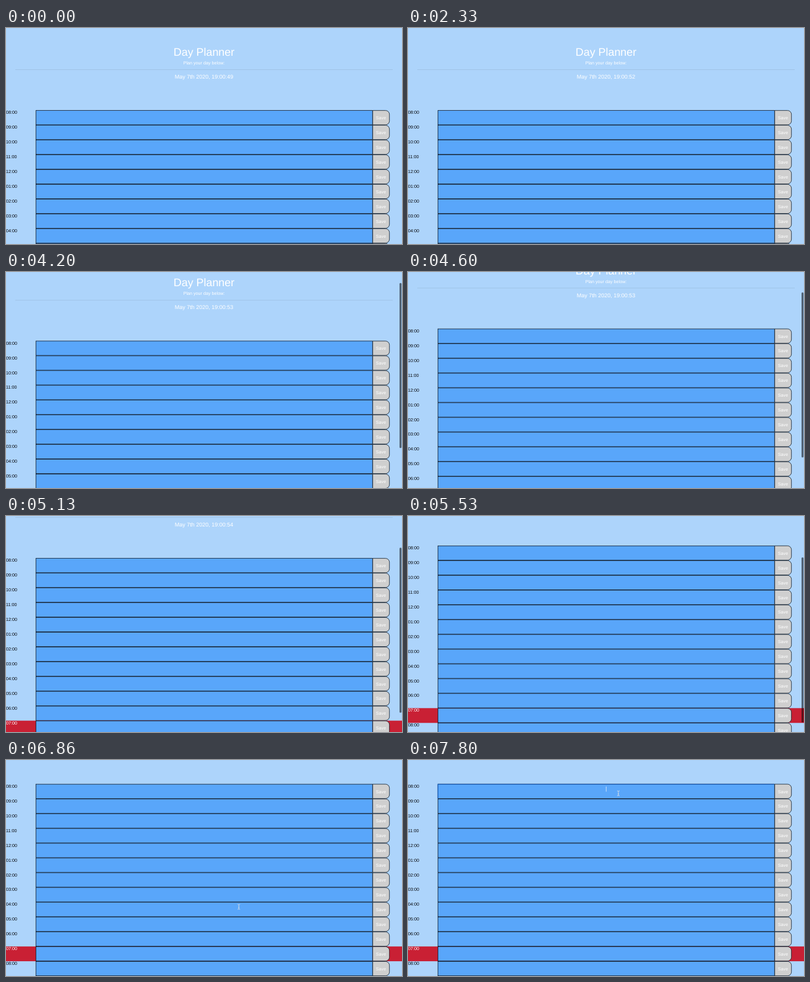
An HTML page that plays this animation: 640 px wide and 350 px high, repeating every 8000 ms.

```html
<!DOCTYPE html>
<html lang="en">
<head>
<meta charset="utf-8">
<title>Day Planner</title>
<style>
  html, body { margin: 0; width: 100%; height: 100%; overflow: hidden; background: #add4fb; }
  svg { display: block; width: 640px; height: 350px; }
  text { font: 7.2px "Liberation Sans", Arial, sans-serif; fill: #fff; text-rendering: geometricPrecision; }
  .middle { text-anchor: middle; }
  .box { stroke: #06101c; stroke-width: .75; }
</style>
</head>
<body>
<svg id="stage" viewBox="0 0 640 350">
  <rect width="640" height="350" fill="#add4fb"/>
  <g id="page">
    <text class="middle" x="320" y="45" style="font-size:17.9px">Day Planner</text>
    <text class="middle" x="320" y="59">Plan your day below:</text>
    <path d="M15 67.5H625" stroke="#000" stroke-opacity=".1" stroke-width=".8"/>
    <text class="middle" id="clock" x="320" y="82.2" style="font-size:9px"></text>
    <g id="rows"></g>
    <g id="focus">
      <path d="M48.4 157V133.8H592" fill="none" stroke="#1a5cb4" stroke-width="1.3"/>
      <path id="caret" d="M320.3 137.5V145.8" stroke="#e4f0fd" stroke-width=".8"/>
    </g>
  </g>
  <rect id="thumb" x="636" width="3.2" height="267.5" rx="1.6" fill="#000" fill-opacity=".54"/>
  <path id="pointer" d="M-2 -4Q0 -4 0 -3Q0 -4 2 -4M0 -3V3M-2 4Q0 4 0 3Q0 4 2 4M-1 1H1"
        fill="none" stroke="#d3dce6" stroke-width=".9"/>
</svg>
<script>
const LOOP = 8000;
const STEP = 1000 / 15;
const ROW_TOP = 133.3;
const ROW_HEIGHT = 23.94;
const CURRENT_ROW = 11;
const TICKS = [330, 1330, 2330, 3330, 4660, 5330];

// time, scroll offset, speed
const SCROLL = [
  [3600, 0, 0],
  [3800, 4, 0.036],
  [4600, 41.5, 0.046],
  [5133, 65, 0.043],
  [5867, 94.5, 0]
];

const el = id => document.getElementById(id);
const show = (node, visible) => node.setAttribute("opacity", +visible);
const clamp = v => Math.max(0, Math.min(1, v));

function add(parent, tag, attrs, text = "") {
  const node = document.createElementNS("http://www.w3.org/2000/svg", tag);
  for (const key in attrs) node.setAttribute(key, attrs[key]);
  node.textContent = text;
  parent.append(node);
}

function buildRow(i) {
  const y = ROW_TOP + i * ROW_HEIGHT;
  const top = y + 0.35, h = ROW_HEIGHT - 0.7, r = 6.4;
  const current = i === CURRENT_ROW;
  const hour = String((i + 7) % 12 + 1).padStart(2, "0");
  const rows = el("rows");
  if (current) add(rows, "rect", { y, width: 640, height: ROW_HEIGHT, fill: "#c92034" });
  add(rows, "text", { x: 0, y: y + 6.1, style: `fill:${current ? "#fff" : "#07090c"}` }, hour + ":00");
  add(rows, "rect", { class: "box", x: 48.3, y: top, width: 544, height: h, fill: "#59a6fa" });
  add(rows, "path", {
    class: "box", fill: "#cfcfcf",
    d: `M592.7 ${top}h${27 - r}a${r} ${r} 0 0 1 ${r} ${r}v${h - 2 * r}a${r} ${r} 0 0 1 ${-r} ${r}h${r - 27}z`
  });
  add(rows, "text", { class: "middle", x: 606, y: y + 14.7 }, "Save");
}

function scrollAt(t) {
  if (t <= SCROLL[0][0]) return 0;
  for (let i = 1; i < SCROLL.length; i++) {
    const [t0, s0, v0] = SCROLL[i - 1], [t1, s1, v1] = SCROLL[i];
    if (t > t1) continue;
    const d = t1 - t0, u = (t - t0) / d, w = 1 - u;
    return w * w * ((1 + 2 * u) * s0 + u * d * v0) + u * u * ((3 - 2 * u) * s1 - w * d * v1);
  }
  return SCROLL[SCROLL.length - 1][1];
}

function render(time) {
  const t = Math.floor((time + 8) / STEP) * STEP;
  const scroll = scrollAt(t);
  const seconds = 49 + TICKS.filter(tick => time >= tick).length;

  el("clock").textContent = "May 7th 2020, 19:00:" + seconds;
  el("page").setAttribute("transform", `translate(0 ${-scroll})`);

  el("thumb").setAttribute("y", 0.9 + 0.775 * scroll);
  show(el("thumb"), 0);
  if (t > 3640) el("thumb").setAttribute("opacity", clamp((6467 - t) / 200));

  const ease = 1 - (1 - clamp((t - 6733) / 867)) ** 3;
  el("pointer").setAttribute("transform", `translate(${400 - 60 * ease} ${358 - 304 * ease})`);
  show(el("pointer"), t > 6780);
  show(el("focus"), t > 7650);
}

for (let i = 0; i < 13; i++) buildRow(i);

const start = performance.now();
function frame() {
  render((performance.now() - start) % LOOP);
  requestAnimationFrame(frame);
}
render(0);
requestAnimationFrame(frame);
</script>
</body>
</html>
```
